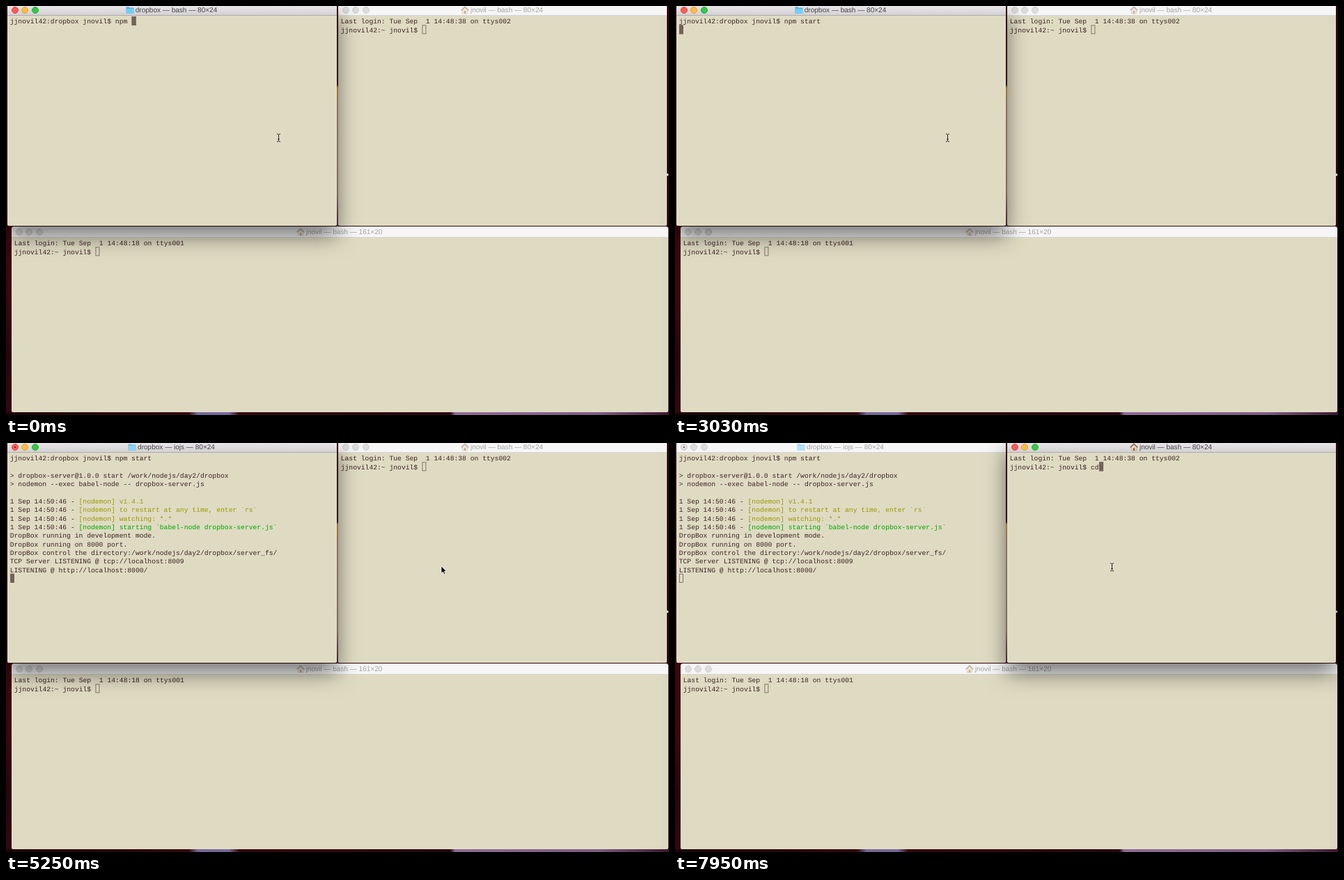
These frames come from a looping animation (952 px wide and 588 px high, 8000 ms). An HTML page:

```html
<!DOCTYPE html>
<html lang="en">
<head>
<meta charset="utf-8">
<title>Terminals</title>
<style>
  html, body { margin: 0; width: 100%; height: 100%; overflow: hidden; }
  body {
    position: relative;
    text-rendering: geometricPrecision;
    background:
      linear-gradient(#f4eeee, #f4eeee) 949px 241px / 2px 3px no-repeat,
      linear-gradient(#3a0608 113px, #dc9a55 117px 128px, #c4958a 140px, #b58880 270px, #5a3a4e 312px)
        475px 0 / 2px 317px no-repeat,
      linear-gradient(90deg, #1d0407, #33070d 262px, #77689a 275px 320px, #33070d 335px, #2a0610 638px,
        #8f6c98 645px, #7d5c84 850px, #3c1730) 0 584px / 952px 4px no-repeat,
      linear-gradient(#350508, #3c070b 420px, #28040a 500px, #34070f) 0 0 / 8px 588px no-repeat,
      #2f0609;
  }
  .window {
    position: absolute; z-index: 1;
    background: #dfdbc3;
    border-radius: 4px 4px 2px 2px;
  }
  #left { left: 2px; top: -2px; width: 473px; height: 318px; }
  #right { left: 477px; top: -2px; width: 472px; height: 318px; }
  #bottom { left: 8px; top: 317px; width: 943px; height: 267px; z-index: 2; }
  #right, #bottom { background: linear-gradient(#dcd8c2, #dcd8c2) right / 11px no-repeat #dfdbc3; }
  .window.active { z-index: 3; box-shadow: 0 14px 32px rgba(0, 0, 0, .55); }

  .bar {
    position: relative; box-sizing: border-box; height: 16px; padding: 1px 2px 0 0;
    display: flex; align-items: center; justify-content: center; gap: 2px;
    font: 10.05px/14px "Liberation Sans", Arial, sans-serif;
    color: #a3a3a3; background: #f6f6f6;
    border-bottom: 1px solid #d6d6d4; border-radius: 4px 4px 0 0;
    white-space: pre;
  }
  .active .bar {
    color: #444; background: linear-gradient(#ebe9eb, #d3d1d3); border-color: #aeacae;
  }
  .title { position: relative; top: .5px; }
  .bar svg { width: 12px; height: 12px; opacity: .5; }
  .active .bar svg { opacity: 1; }
  .active.busy .bar svg { opacity: .75; }

  .light {
    position: absolute; top: 3px; box-sizing: border-box; width: 10px; height: 10px;
    border-radius: 50%; background: #dddddd; border: .5px solid #cdcdcd;
  }
  .light:nth-child(1) { left: 5.5px; }
  .light:nth-child(2) { left: 20px; }
  .light:nth-child(3) { left: 34.5px; }
  .active .light:nth-child(1) { background: #fc5b57; border-color: #e2443f; }
  .active .light:nth-child(2) { background: #fdbc40; border-color: #dfa032; }
  .active .light:nth-child(3) { background: #34c84a; border-color: #27aa35; }
  .busy .light:nth-child(1)::after {
    content: ""; position: absolute; inset: 3px;
    border-radius: 50%; background: #555;
  }
  .active.busy .light:nth-child(1)::after { background: #5c0503; }

  pre {
    position: absolute; left: 3.7px; top: 19.3px; margin: 0;
    font: 9.7px/12.35px "Liberation Mono", "Courier New", monospace;
    color: #3b2322;
  }
  .yellow { color: #999900; }
  .green { color: #00a600; }
  .caret {
    position: absolute; left: 3.6px; top: 17.4px; box-sizing: border-box;
    width: 6px; height: 12.3px; border: 1px solid #83766a;
  }
  .active .caret { background: #73635a; border-color: #73635a; }

  .pointer { position: absolute; left: 0; top: 0; z-index: 4; overflow: visible; }
</style>
</head>
<body>
<svg width="0" height="0" style="position:absolute">
  <symbol id="folder" viewBox="0 0 12 12">
    <path d="M.5 2.2q0-.9.9-.9h3l1.1 1.2h5.1q.9 0 .9.9v6.4q0 .9-.9.9H1.4q-.9 0-.9-.9z" fill="#4fb3e4"/>
    <path d="M.5 4h11v5.8q0 .9-.9.9H1.4q-.9 0-.9-.9z" fill="#74cdf5"/>
  </symbol>
  <symbol id="home" viewBox="0 0 12 12">
    <path d="M2.2 6 6 2.5 9.8 6v5H2.2z" fill="#e6d9c0" stroke="#a58d6c" stroke-width=".5"/>
    <path d="M.7 6.4 6 1.3l5.3 5.1" fill="none" stroke="#8c6a4d" stroke-width="1.5"/>
    <path d="M4.9 7.2h2.3V11H4.9z" fill="#8a6038"/>
  </symbol>
</svg>

<div class="window" id="left"></div>
<div class="window" id="right"></div>
<div class="window" id="bottom"></div>

<svg class="pointer" id="beam" width="1" height="1">
  <path d="M-2.5-5.5q2 0 2.5 1 .5-1 2.5-1M0-4.5v9M-2.5 5.5q2 0 2.5-1 .5 1 2.5 1M-1.2 2h2.4" fill="none" stroke="#222" stroke-width="1"/>
</svg>
<svg class="pointer" id="arrow" width="1" height="1">
  <path d="M.5.5v10.2l2.4-2.2 1.5 3.6 1.8-.8-1.5-3.4h3.1z" fill="#000" stroke="#fff" stroke-width=".7"/>
</svg>

<script>
const LOOP = 8000, CELL = 5.82, ROW = 12.35;
const USER = 'jnovil', HOST = 'jjnovil42';
const $ = id => document.getElementById(id);

const prompt = dir => `${HOST}:${dir} ${USER}$ `;
const login = (time, tty) => `Last login: Tue Sep  1 14:48:${time} on ttys00${tty}`;
const log = (color, text) => `1 Sep 14:50:46 - <span class="${color}">[nodemon] ${text}</span>`;

// Typed text: one character per keystroke time.
const typed = (text, times, t) => text.slice(0, times.filter(at => at <= t).length);
// Latest entry of a [time, ...values] schedule.
const current = (schedule, t) => schedule.filter(step => step[0] <= t).pop();

const ENTER = 3030, RUN = 3170, FOCUS = 6750;
const output = [
  [3620, '',
    '> dropbox-server@1.0.0 start /work/nodejs/day2/dropbox',
    '> nodemon --exec babel-node -- dropbox-server.js',
    ''],
  [3920,
    log('yellow', 'v1.4.1'),
    log('yellow', 'to restart at any time, enter `rs`'),
    log('yellow', 'watching: *.*'),
    log('green', 'starting `babel-node dropbox-server.js`')],
  [5250,
    'DropBox running in development mode.',
    'DropBox running on 8000 port.',
    'DropBox control the directory:/work/nodejs/day2/dropbox/server_fs/',
    'TCP Server LISTENING @ tcp://localhost:8009',
    'LISTENING @ http://localhost:8000/']
];
const processes = [[0, 'bash'], [RUN, 'iojs'], [3920, 'sh'], [4060, 'iojs']];
const pointer = [
  [0, 'beam', 391.5, 189.5],
  [4660, 'arrow', 498, 170],
  [4810, 'arrow', 598.5, 185],
  [4960, 'arrow', 622.5, 178.5],
  [5100, 'arrow', 624.5, 176.5],
  [6450, 'arrow', 625.5, 177],
  [6600, 'beam', 627.5, 178.5]
];

function buildWindow(id, icon) {
  $(id).innerHTML = `<div class="bar">${'<i class="light"></i>'.repeat(3)}` +
    `<svg><use href="#${icon}"/></svg><span class="title"></span></div><pre></pre><div class="caret"></div>`;
}

function setHtml(el, html) {
  if (el.shown !== html) el.innerHTML = el.shown = html;
}

function drawWindow(id, title, lines, active) {
  const win = $(id), caret = win.querySelector('.caret');
  win.classList.toggle('active', active);
  setHtml(win.querySelector('.title'), title);
  setHtml(win.querySelector('pre'), lines.join('\n'));
  const col = lines[lines.length - 1].length, row = lines.length - 1;
  caret.style.transform = `translate(${col * CELL}px, ${row * ROW}px)`;
}

function render(t) {
  const command = prompt('dropbox') + 'npm ' + typed('start', [150, 1080, 1230, 1380, 1680], t);
  const printed = output.filter(block => block[0] <= t).flatMap(block => block.slice(1));
  drawWindow('left', `dropbox — ${current(processes, t)[1]} — 80×24`,
    t < ENTER ? [command] : [command, ...printed, ''], t < FOCUS);
  $('left').classList.toggle('busy', t >= RUN);

  drawWindow('right', `${USER} — bash — 80×24`,
    [login(38, 2), prompt('~') + typed('cd', [7800, 7950], t)], t >= FOCUS);
  drawWindow('bottom', `${USER} — bash — 161×20`, [login(18, 1), prompt('~')], false);

  const [, shape, x, y] = current(pointer, t);
  for (const id of ['beam', 'arrow']) $(id).style.display = id === shape ? 'block' : 'none';
  $(shape).style.transform = `translate(${x}px, ${y}px)`;
}

buildWindow('left', 'folder');
buildWindow('right', 'home');
buildWindow('bottom', 'home');

const start = performance.now();
function tick() {
  render((performance.now() - start) % LOOP);
  requestAnimationFrame(tick);
}
tick();
</script>
</body>
</html>
```
